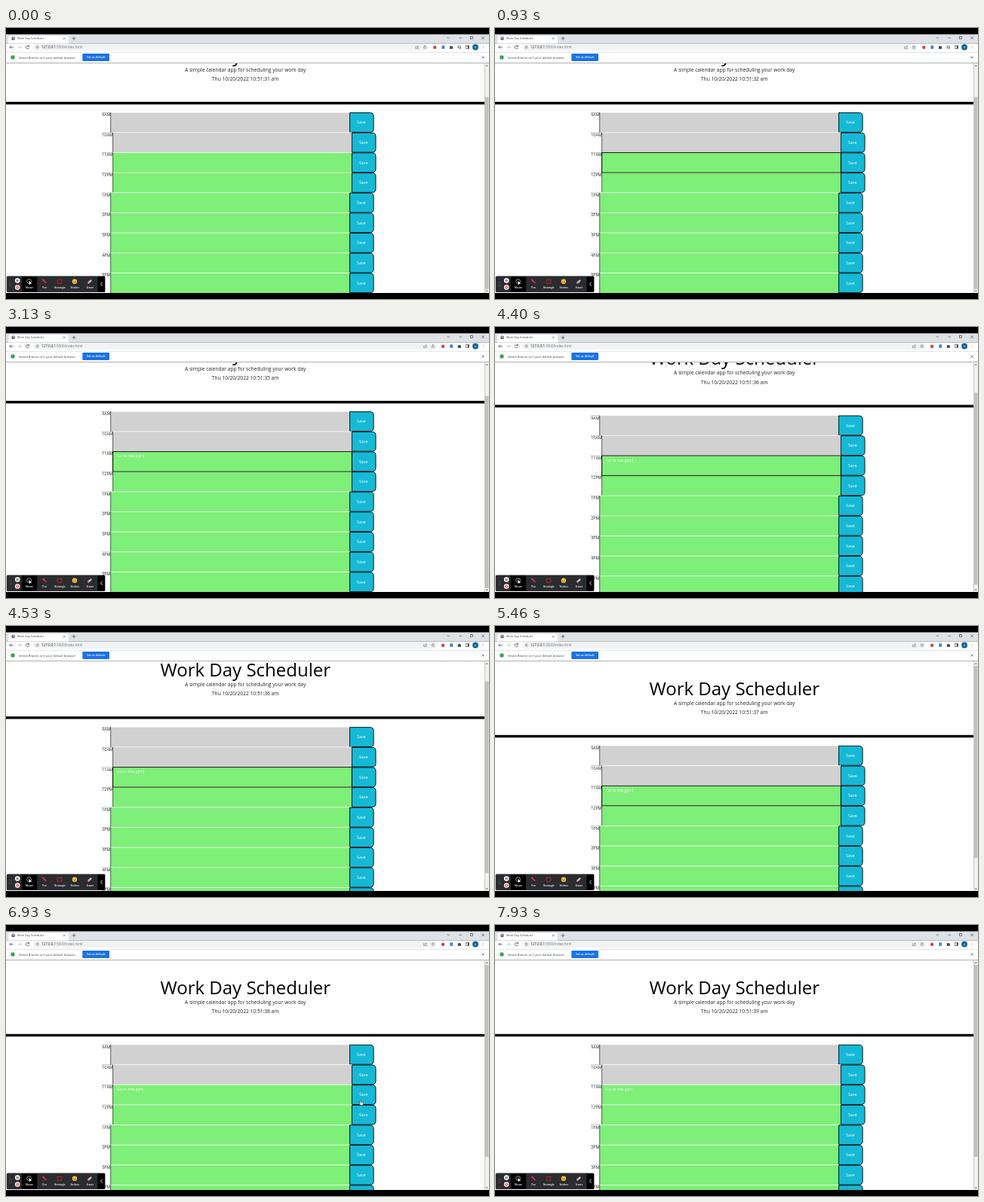
Write an HTML page that moves like this. It is 640 px wide and 360 px high and loops after 8 s.

```html
<!DOCTYPE html>
<html lang="en">
<head>
<meta charset="utf-8">
<title>Work Day Scheduler</title>
<style>
  html, body { margin: 0; width: 100%; height: 100%; overflow: hidden; background: #000; }
  svg { display: block; width: 100vw; height: 100vh; font-family: "Open Sans", "Noto Sans", sans-serif; }
  .mid { text-anchor: middle; }
  .line { fill: none; stroke-linecap: round; stroke-linejoin: round; }
</style>
</head>
<body>
<svg id="stage" viewBox="0 0 640 360"></svg>
<script>
const LOOP = 8000;
const ROW_TOP = 158.9, ROW_H = 26.65, LEFT = 127.3, FIELD_W = 316.8, MAX_SCROLL = 46.7;
const HOURS = ["9AM", "10AM", "11AM", "12PM", "1PM", "2PM", "3PM", "4PM", "5PM"];
const ACTIVE = 2;
const NOTE = "Go to the gym";
const KEYS = [1660, 1800, 1860, 1930, 2060, 2130, 2260, 2330, 2460, 2600, 2800, 3000, 3130];
const FOCUS = 400, BLUR = 6700, BLINK = 520;
const CENTER = 317.2;

const rect = (x, y, w, h, fill, extra = "") =>
  `<rect x="${x}" y="${y}" width="${w}" height="${h}" fill="${fill}" ${extra}/>`;
const circle = (x, y, r, fill, extra = "") =>
  `<circle cx="${x}" cy="${y}" r="${r}" fill="${fill}" ${extra}/>`;
const text = (x, y, size, str, fill = "#212529", extra = "") =>
  `<text x="${x}" y="${y}" font-size="${size}" fill="${fill}" ${extra}>${str}</text>`;
const line = (d, stroke = "#45484c", width = 0.6, extra = "") =>
  `<path class="line" d="${d}" stroke="${stroke}" stroke-width="${width}" ${extra}/>`;
const shape = (d, fill, extra = "") => `<path d="${d}" fill="${fill}" ${extra}/>`;
const cross = (x, y, r, color) =>
  line(`M${x - r} ${y - r}l${2 * r} ${2 * r}m0 ${-2 * r}l${-2 * r} ${2 * r}`, color);
const at = (x, y, body, id = "") => `<g ${id && `id="${id}"`} transform="translate(${x} ${y})">${body}</g>`;

const rowY = i => ROW_TOP + i * ROW_H;
const fieldX = i => HOURS[i].length > 3 ? 141.6 : 138.7;

function row(label, i) {
  const y = rowY(i), x = fieldX(i), end = x + FIELD_W;
  const fill = i < 2 ? "#d1d1d1" : "#7eef78";
  const button = `M${end} ${y + 0.4}h27q4.6 0 4.6 4.6v${ROW_H - 10}q0 4.6 -4.6 4.6h-27z`;
  return line(`M${LEFT} ${y + 0.2}H${x}`, "#444", 0.4, 'stroke-dasharray="1 1"')
    + text(LEFT, y + 5, 5.33, label)
    + rect(x, y, FIELD_W, ROW_H, fill)
    + line(`M${x} ${y}H${end}`, "#fff", 0.7)
    + line(`M${x} ${y + 0.3}v${ROW_H - 0.6}`, "#222", 0.7)
    + shape(button, "#16b9d5", 'stroke="#000" stroke-width=".9"')
    + text(end + 15.3, y + 15.2, 5.33, "Save", "#fff", 'class="mid"');
}

function pageContent() {
  const y = rowY(ACTIVE), x = fieldX(ACTIVE);
  return rect(0, 0, 635, 420, "#fff")
    + text(CENTER, 91.6, 24, "Work Day Scheduler", "#000", 'class="mid"')
    + text(CENTER, 104.8, 6.67, "A simple calendar app for scheduling your work day", "#212529", 'class="mid"')
    + text(CENTER, 116.9, 6.67, "", "#212529", 'class="mid" id="clock"')
    + rect(0, 144.8, 634.4, 3.4, "#000")
    + HOURS.map(row).join("")
    + rect(x, y + 0.1, FIELD_W, ROW_H - 0.2, "none", 'id="focus" stroke="#000" stroke-width=".9"')
    + text(x + 5.4, y + 7.9, 5.33, "", "#fff", 'id="note"')
    + rect(0, y + 3, 0.5, 6, "#fff", 'id="caret"');
}

function scrollbar() {
  return rect(634.3, 47, 5.7, 305, "#f1f1f1")
    + shape("M635.8 50.8l1.4-1.7 1.4 1.7z", "#555")
    + shape("M635.8 348.6l1.4 1.7 1.4-1.7z", "#555")
    + rect(634.8, 53, 4.7, 255, "#c1c1c1", 'id="thumb"');
}

function browserFrame() {
  const gray = "#5f6368";
  const tabs = rect(0, 8.4, 640, 12, "#dee1e6")
    + shape("M2 20.4q1.4 0 1.4-1.6v-6.2q0-2 2-2h75.4q2 0 2 2v6.2q0 1.6 1.4 1.6z", "#fff")
    + circle(9.6, 13.9, 2.4, gray)
    + line("M8 13l2 .4.4 1.4M10 11.9l.8 1.2", "#fff", 0.5)
    + text(15, 15.2, 3.75, "Work Day Scheduler", "#3c4043")
    + cross(77.2, 13.9, 1.2, gray)
    + line("M88 13.9h4m-2-2v4", "#45484c", 0.7)
    + line("M584.7 12.4l1.6 1.6 1.6-1.6M600.5 13.2h3.2")
    + rect(615.6, 11.6, 3, 3, "none", 'stroke="#333" stroke-width=".6"')
    + cross(632, 13.2, 1.5, "#333");
  const nav = rect(0, 20.4, 640, 12.4, "#fff")
    + line("M9.4 25.5H5m2-2l-2 2 2 2", "#45484c", 0.7)
    + line("M15.8 25.5h4.4m-2-2l2 2-2 2", "#b5b8bb", 0.7)
    + line("M30.3 24.2a2.2 2.2 0 1 0 .3 2M30.6 22.9v1.6h-1.7", "#45484c", 0.7)
    + rect(36, 21.1, 524, 8.8, "#f1f3f4", 'rx="4.4" id="address"')
    + circle(41.6, 25.5, 1.7, "none", `stroke="${gray}" stroke-width=".5"`)
    + line("M41.6 25.3v1M41.6 24.5v.1", gray, 0.5)
    + text(47, 27, 4.5, `127.0.0.1<tspan fill="#70757a">:5500/index.html</tspan>`, "#202124");
  const share = line("M-1.2-.8h-.8v2.8h3.8v-1M-.8.8q0-1.8 2.4-1.8M.8-2l1.2 1-1.2 1", gray, 0.5);
  const star = line("M0-2.1l.6 1.4 1.5.1-1.1 1 .3 1.5L0 1.1l-1.3.8.3-1.5-1.1-1 1.5-.1z", gray, 0.5);
  const puzzle = shape("M-2-1.2h1.1a.9.9 0 0 1 1.7 0H2v1.1a.9.9 0 0 1 0 1.7V2.2h-4V.9a.9.9 0 0 0 0-1.5z", "#45484c");
  const icons = at(0, 25.5,
    at(555.5, 0, share) + at(565.8, 0, star)
    + circle(579, 0.2, 2.2, "#dc3d45")
    + rect(588.2, -2.2, 3.8, 4.4, "#4285d8")
    + at(600.6, 0, puzzle), "icons");
  const media = at(600.6, 25.5,
    line("M-2-1.6h3M-2-.2h2M-2 1.2h1.3M1.7-1.4v2.6", "#45484c", 0.6) + circle(1.1, 1.4, 0.8, "#45484c"), "media");
  const right = rect(609.3, 23.4, 4.2, 4, "none", 'stroke="#45484c" stroke-width=".6"')
    + rect(611.7, 23.4, 1.8, 4, "#45484c")
    + circle(622, 25.5, 3.9, "#09639a")
    + text(622, 26.9, 3.8, "A", "#d8ecf6", 'class="mid"')
    + [-1.6, 0, 1.6].map(d => circle(632.2, 25.5 + d, 0.45, gray)).join("");
  const notice = rect(0, 32.4, 640, 14.2, "#fff")
    + line("M0 32.5H640M0 46.7H640", "#dfe1e4", 0.4)
    + circle(9, 39, 2.7, "#36a552")
    + text(17, 40.5, 4, "Velora Bramin isn't your default browser", "#3c4043")
    + rect(101.3, 34, 35.7, 10, "#1a73e8", 'rx="1.3"')
    + text(119.2, 40.4, 3.75, "Set as default", "#fff", 'class="mid" font-weight="600"')
    + cross(632, 39, 1.3, "#45484c");
  return tabs + nav + icons + media + right + notice;
}

function recorderBar() {
  const labels = ["Mouse", "Pen", "Rectangle", "Stickers", "Eraser"];
  const dots = [0, 1, 2].map(i =>
    circle(5.2, 337.8 + i * 2.5, 0.45, "#999") + circle(7, 337.8 + i * 2.5, 0.45, "#999")).join("");
  return rect(0.8, 329.6, 130.6, 21.4, "#2b2c30", 'rx="1.5"')
    + rect(20.8, 330.3, 20.4, 20, "#000")
    + rect(121.4, 330.3, 9.6, 20, "#000")
    + dots
    + circle(15.2, 335.6, 3.3, "#fff") + line("M14.3 334.4v2.4m1.8-2.4v2.4", "#222", 0.8)
    + circle(15.2, 344.6, 3.3, "#fff") + circle(15.2, 344.6, 2.2, "#e2574c")
    + cross(15.2, 344.6, 0.9, "#fff")
    + circle(30.6, 336.6, 2.9, "none", 'stroke="#d9d9d9" stroke-width=".7"')
    + shape("M30.2 335.8l4 3.8-2 .1-1.2 1.6z", "#fff")
    + line("M49.4 335.2l3.4 3.2M48.8 334.6l1.2.2", "#e8313a", 1.7)
    + rect(68.2, 334.3, 5.6, 5, "none", 'stroke="#d3202c" stroke-width=".8"')
    + circle(90.9, 336.8, 3.2, "#f6c945")
    + line("M89.7 336v.2M92.1 336v.2M89.3 337.6q1.6 1.8 3.2 0", "#5a3b10", 0.6)
    + line("M109.6 338.2l2.8-2.6", "#c9c3c6", 2.4) + line("M109.2 338.5l.6-.5", "#e58f9a", 2.3)
    + labels.map((s, i) => text(31 + 20.1 * i, 346.2, 3.1, s, "#fff", 'class="mid" font-weight="600"')).join("")
    + line("M127.3 338l-1.8 2.2 1.8 2.2", "#fff", 0.8);
}

const hand = shape(
  "M-.9-3.2q.8-.9 1.4 0v2.3l2.3.6q.8.3.7 1.2L3 3.6H-.4L-2.4.9q.1-1 1-.5l.5.5z",
  "#fff", 'stroke="#111" stroke-width=".5"');

document.getElementById("stage").innerHTML =
  `<clipPath id="view"><rect y="46.9" width="634.4" height="305.1"/></clipPath>`
  + rect(0, 0, 640, 360, "#000")
  + `<g clip-path="url(#view)"><g id="page">${pageContent()}</g></g>`
  + scrollbar() + browserFrame() + recorderBar()
  + at(0, 0, hand, "hand")
  + rect(0, 352, 640, 8, "#000");

const el = id => document.getElementById(id);
const [page, clock, focusRing, note, caret, thumb, icons, media, address, cursor] =
  ["page", "clock", "focus", "note", "caret", "thumb", "icons", "media", "address", "hand"].map(el);
const move = (node, x, y) => node.setAttribute("transform", `translate(${x} ${y})`);
const show = (node, on) => node.setAttribute("visibility", on ? "visible" : "hidden");
const ease = (t, from, to) => {
  const p = Math.min(1, Math.max(0, (t - from) / (to - from)));
  return p * p * (3 - 2 * p);
};

let typed = -1;
function setNote(count) {
  if (count === typed) return;
  typed = count;
  note.textContent = NOTE.slice(0, count);
  // Measure a trailing space through the difference with a visible glyph.
  const start = fieldX(ACTIVE) + 5.4;
  let width = count ? note.getComputedTextLength() : 0;
  if (NOTE[count - 1] === " ") {
    note.textContent = NOTE.slice(0, count - 1);
    width = note.getComputedTextLength() + 1.39;
  }
  caret.setAttribute("x", start + width + 0.1);
}

function draw(t) {
  const scroll = MAX_SCROLL * (1 - ease(t, 4300, 4780));
  move(page, 0, -scroll);
  move(thumb, 0, scroll * 0.83);

  clock.textContent = `Thu 10/20/2022 10:51:${32 + Math.floor((t - 90) / 1000)} am`;

  const count = KEYS.filter(k => k <= t).length;
  setNote(count);
  const focused = t >= FOCUS && t < BLUR;
  const since = t - (count ? KEYS[count - 1] : FOCUS);
  show(focusRing, focused);
  show(caret, focused && Math.floor(since / BLINK) % 2 === 0);

  const playing = t < 2000;
  move(icons, playing ? -10.8 : 0, 25.5);
  show(media, playing);
  address.setAttribute("width", playing ? 524 : 535);

  const reach = ease(t, 6300, 6700) - ease(t, 7400, 7600);
  show(cursor, t >= 6300 && t < 7600);
  move(cursor, 460 + 10 * reach, 230 + 6 * reach);
}

const began = performance.now();
function tick() {
  draw((performance.now() - began) % LOOP);
  requestAnimationFrame(tick);
}
draw(0);
requestAnimationFrame(tick);
</script>
</body>
</html>
```
